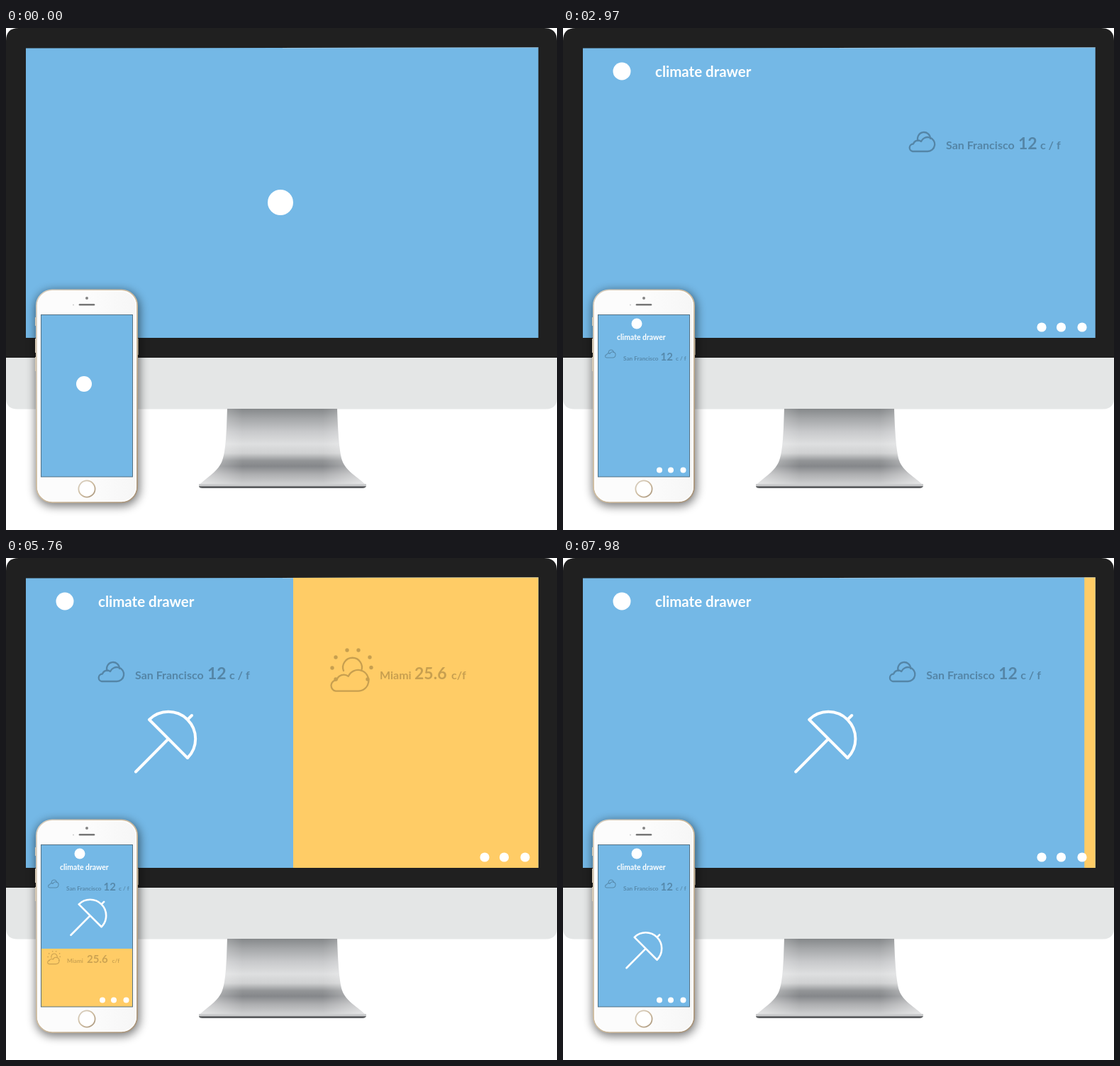
Write an HTML page that moves like this. It is 777 px wide and 708 px high and loops after 8000 ms.

```html
<!DOCTYPE html>
<html lang="en">
<head>
<meta charset="utf-8">
<title>Weather outfits</title>
<style>
  html, body { margin: 0; width: 100%; height: 100%; overflow: hidden; background: #fff; }
  svg { display: block; width: 100%; height: 100%; }
  text { font-family: Lato, "Open Sans", sans-serif; font-weight: 700; }
  .line { fill: none; stroke: #fff; stroke-linecap: round; stroke-linejoin: round; }
  .icon { fill: none; stroke: #000; stroke-linecap: round; stroke-linejoin: round; }
  .thin { vector-effect: non-scaling-stroke; }
</style>
</head>
<body>
<svg id="stage" viewBox="0 0 777 708">
  <defs>
    <linearGradient id="neck" x1="0" y1="0" x2="0" y2="1">
      <stop offset="0" stop-color="#85888a"/>
      <stop offset=".12" stop-color="#a3a5a7"/>
      <stop offset=".3" stop-color="#c8c9cb"/>
      <stop offset=".46" stop-color="#dedfe0"/>
      <stop offset=".58" stop-color="#cfd0d1"/>
      <stop offset=".68" stop-color="#939597"/>
      <stop offset=".75" stop-color="#85878a"/>
      <stop offset=".86" stop-color="#aeafb1"/>
      <stop offset="1" stop-color="#d2d3d4"/>
    </linearGradient>
    <linearGradient id="flare">
      <stop offset="0" stop-color="#fff" stop-opacity=".5"/>
      <stop offset=".26" stop-color="#fff" stop-opacity="0"/>
      <stop offset=".74" stop-color="#fff" stop-opacity="0"/>
      <stop offset="1" stop-color="#fff" stop-opacity=".5"/>
    </linearGradient>
    <linearGradient id="gold" x1="0" y1="0" x2="1" y2="1">
      <stop offset="0" stop-color="#d9d0c2"/>
      <stop offset=".5" stop-color="#cdbb9f"/>
      <stop offset="1" stop-color="#a8947b"/>
    </linearGradient>
    <linearGradient id="shell" x1="0" y1="0" x2="1" y2="0">
      <stop offset=".5" stop-color="#fcfcfc"/>
      <stop offset="1" stop-color="#f6f6f6"/>
    </linearGradient>
    <filter id="shadow" x="-20%" y="-10%" width="140%" height="120%">
      <feGaussianBlur stdDeviation="7"/>
    </filter>
    <clipPath id="deskClip"><path d="M28 28.5L750.7 27.5V437H28Z"/></clipPath>
    <clipPath id="phoneClip"><rect x="49.5" y="404.5" width="129" height="228.5"/></clipPath>

    <path id="stand" d="M312 537H467C468 570 470 597 474 610C479 625 497 634 508 645H272C283 634 300 625 305 610C310 597 311 570 312 537Z"/>
    <path id="cloud" class="thin" d="M8 28H29A10 10 0 1 0 20 14A7 7 0 0 0 9 17.5A5.3 5.3 0 0 0 8 28Z"/>
    <g id="cloudy">
      <use href="#cloud"/>
      <path class="thin" d="M15.5 13A9 9 0 1 1 33 10"/>
    </g>
    <g id="sunny">
      <use href="#cloud" transform="translate(0 20) scale(1.49)"/>
      <path class="thin" d="M23 33A13.4 13.4 0 1 1 48 33"/>
      <g id="rays" fill="#000" stroke="none"></g>
    </g>
    <path id="umbrella" class="line" d="M-22.5 -31.5A38 38 0 0 1 31.5 22.5ZM4.5 -4.5L-41.5 42M31.5 -31.5L37.5 -37.5"/>
    <g id="glasses" class="line">
      <path id="lens" d="M-85 -24L-9 -9Q-4 -8 -5 -3C-8 15 -17 26 -44 26C-68 26 -78 4 -85 -24Z"/>
      <use href="#lens" transform="scale(-1 1)"/>
      <path d="M-5 -8H5"/>
    </g>
  </defs>

  <path d="M0 466V18Q0 0 18 0H759Q777 0 777 18V466Z" fill="#202020"/>
  <path d="M0 465H777V522Q777 537.5 761 537.5H16Q0 537.5 0 522Z" fill="#e4e6e6"/>
  <use href="#stand" fill="url(#neck)"/>
  <use href="#stand" fill="url(#flare)"/>
  <path d="M272 643.5H508V646Q507 649 503 649H277Q272 649 272 646Z" fill="#5a5c5e"/>
  <path d="M272 643H508V646.3H272Z" fill="#cbcccd"/>
  <g id="desk" clip-path="url(#deskClip)"></g>

  <rect x="42" y="371" width="146" height="303" rx="24" opacity=".55" filter="url(#shadow)"/>
  <path d="M42.5 408v12M42.5 438v20M42.5 464v20M185 438v23" stroke="#d6c9b4" stroke-width="3"/>
  <rect x="43" y="369.5" width="142" height="299.5" rx="22" fill="url(#shell)" stroke="url(#gold)" stroke-width="2"/>
  <rect x="44.7" y="371" width="138.6" height="296.5" rx="20.5" fill="none" stroke="#fff" stroke-width="1.5"/>
  <circle cx="114" cy="381" r="2" fill="#858585"/>
  <circle cx="95" cy="390.5" r=".9" fill="#c8c8c8"/>
  <path d="M104 390.3H124" stroke="#777" stroke-width="2.6" stroke-linecap="round"/>
  <circle cx="114" cy="650" r="11.6" fill="#fff" stroke="url(#gold)" stroke-width="1.8"/>
  <g id="phone" clip-path="url(#phoneClip)"></g>
  <rect x="49.5" y="404.5" width="129" height="228.5" fill="none" stroke="#47667a" stroke-width=".9"/>
</svg>

<script>
const LOOP = 8000;
const BLUE = "#74b8e6", YELLOW = "#ffcc66";
const NS = "http://www.w3.org/2000/svg";
const $ = id => document.getElementById(id);
const clamp = x => Math.max(0, Math.min(1, x));
const ease = x => (1 - Math.cos(Math.PI * clamp(x))) / 2;
const mix = (a, b, k) => a + (b - a) * k;

function set(el, attrs) {
  for (const key in attrs) el.setAttribute(key, attrs[key]);
}
function add(parent, tag, attrs = {}) {
  const el = document.createElementNS(NS, tag);
  set(el, attrs);
  parent.append(el);
  return el;
}

for (const [cx, cy] of [[28, 4], [44, 4], [12, 14], [60, 14], [7, 29], [62, 28.5], [12, 45], [57, 45]])
  add($("rays"), "circle", { cx, cy, r: 2.7 });

// Out at `start`, back at `back`.
const outAndBack = (t, start, dur, back, backDur) =>
  ease((t - start) / dur) - ease((t - back) / backDur);

const typed = (text, t, start, step) =>
  text.slice(0, Math.max(0, Math.floor((t - start) / step)));

// Fades in while shrinking onto its place.
function pop(el, t, start, x, y, size = 1) {
  const k = clamp((t - start) / 300);
  set(el, { opacity: k, transform: `translate(${x} ${y}) scale(${size * (1.5 - k / 2)})` });
}

function makeScreen(id, o) {
  const root = $(id);
  const label = (parent, x, size) => add(parent, "text", { x, "font-size": size });
  const reading = opacity => add(root, "g", { opacity });
  const labels = (g, xs) => xs.map((x, i) => label(g, x, i === 1 ? o.big : o.small));
  const icon = (parent, href, [x, y], size) => add(parent, "use", {
    href, class: "icon", "stroke-width": o.stroke, transform: `translate(${x} ${y}) scale(${size})`
  });

  add(root, "rect", { x: o.x, y: o.y, width: o.w, height: o.h, fill: BLUE });
  if (o.glint) add(root, "path", { d: o.glint, stroke: "#b9d3e3" });
  const cold = reading(o.dim);
  const umbrella = add(root, "use", { href: "#umbrella", "stroke-width": o.line / o.umbrellaSize });
  const panel = add(root, "rect", { x: o.x, y: o.y, width: o.w + 40, height: o.h + 40, fill: YELLOW });
  const warm = reading(o.dim * .8);
  const glasses = add(root, "use", { href: "#glasses", "stroke-width": o.line / o.glassesSize });
  const logo = add(root, "circle", { fill: "#fff" });
  const title = label(root, o.titleX, o.titleSize);
  set(title, { y: o.titleY, fill: "#fff" });

  return {
    o, cold, umbrella, panel, warm, glasses, logo, title,
    coldText: labels(cold, o.coldX),
    warmText: labels(warm, o.warmX),
    coldIcon: icon(cold, "#cloudy", o.cloudAt, o.cloudSize),
    warmIcon: icon(warm, "#sunny", o.sunAt, o.sunSize),
    dots: o.dotX.map(() => add(root, "circle", { r: o.dotR, fill: "#fff" }))
  };
}

const desk = makeScreen("desk", {
  x: 28, y: 27, w: 724, h: 411, glint: "M390 28L751 27.5",
  titleX: 130, titleY: 69, titleSize: 20.5,
  small: 16, big: 23, dim: .27, stroke: 2.3,
  coldX: [-223, -121, -90], warmX: [122, 171, 223],
  cloudAt: [-278, -25], cloudSize: 1, sunAt: [48, -45], sunSize: 1,
  line: 4, umbrellaSize: 1, glassesSize: 1,
  logoFrom: [387, 246, 18], logoTo: [83, 61, 12.5],
  dotX: [675, 702.5, 732], dotY: 422, dotR: 6.6, cityStep: 14
});
const phone = makeScreen("phone", {
  x: 49, y: 404, w: 130, h: 230,
  titleX: 76, titleY: 439.5, titleSize: 10.4,
  small: 8.2, big: 15, dim: .25, stroke: 1.05,
  coldX: [85, 137.5, 159], warmX: [86, 114, 149.5],
  cloudAt: [58, -15.5], cloudSize: .41, sunAt: [57, -17.5], sunSize: .31,
  line: 2.6, umbrellaSize: .59, glassesSize: .42,
  logoFrom: [110, 502, 11], logoTo: [104, 417, 7.5],
  dotX: [136, 152, 169.5], dotY: 623.5, dotR: 4, cityStep: 20
});

function drawCommon(s, t) {
  const o = s.o;
  const k = ease((t - 840) / 720);
  const [cx, cy, r] = o.logoFrom.map((v, i) => mix(v, o.logoTo[i], k));
  set(s.logo, { cx, cy, r });
  s.title.textContent = typed("climate drawer", t, 1435, 30);

  const [city, degrees, unit] = s.coldText;
  city.textContent = typed("San Francisco", t, 1640, o.cityStep);
  degrees.textContent = typed("12", t, 1960, 60);
  unit.textContent = typed("c / f", t, 2130, 50);
  set(s.coldIcon, { opacity: clamp((t - 1620) / 180) });

  const [warmCity, warmDegrees, warmUnit] = s.warmText;
  warmCity.textContent = typed("Miami", t, 5270, 30);
  warmDegrees.textContent = typed("25.6", t, 5450, 35);
  warmUnit.textContent = typed("c/f", t, 5620, 35);
  set(s.warmIcon, { opacity: clamp((t - 5200) / 300) });

  s.dots.forEach((dot, i) => pop(dot, t, 2130, o.dotX[i], o.dotY));
}

function draw(t) {
  drawCommon(desk, t);
  drawCommon(phone, t);

  const edge = 763 - 358 * outAndBack(t, 4431, 1040, 7132, 1035);
  const slide = outAndBack(t, 4846, 876, 6891, 876);
  set(desk.panel, { x: edge });
  set(desk.cold, { transform: `translate(${edge} 171)` });
  set(desk.warm, { transform: `translate(${edge} 171)` });
  pop(desk.umbrella, t, 3000, edge - 365.5 + 185 * slide, 259.5);
  pop(desk.glasses, t, 5985, edge + 136, 274);

  const top = 643 - 92 * outAndBack(t, 4431, 1040, 6959, 1122);
  const lift = outAndBack(t, 4846, 876, 6873, 876);
  set(phone.panel, { y: top });
  set(phone.cold, { transform: "translate(0 469)" });
  set(phone.warm, { transform: `translate(0 ${top + 20})` });
  pop(phone.umbrella, t, 3000, 114 + 2 * lift, 553.5 - 46.5 * lift, phone.o.umbrellaSize);
  pop(phone.glasses, t, 5985, 118.5, top + 45.5, phone.o.glassesSize);
}

const begin = performance.now();
function tick() {
  draw((performance.now() - begin) % LOOP);
  requestAnimationFrame(tick);
}
tick();
</script>
</body>
</html>
```
